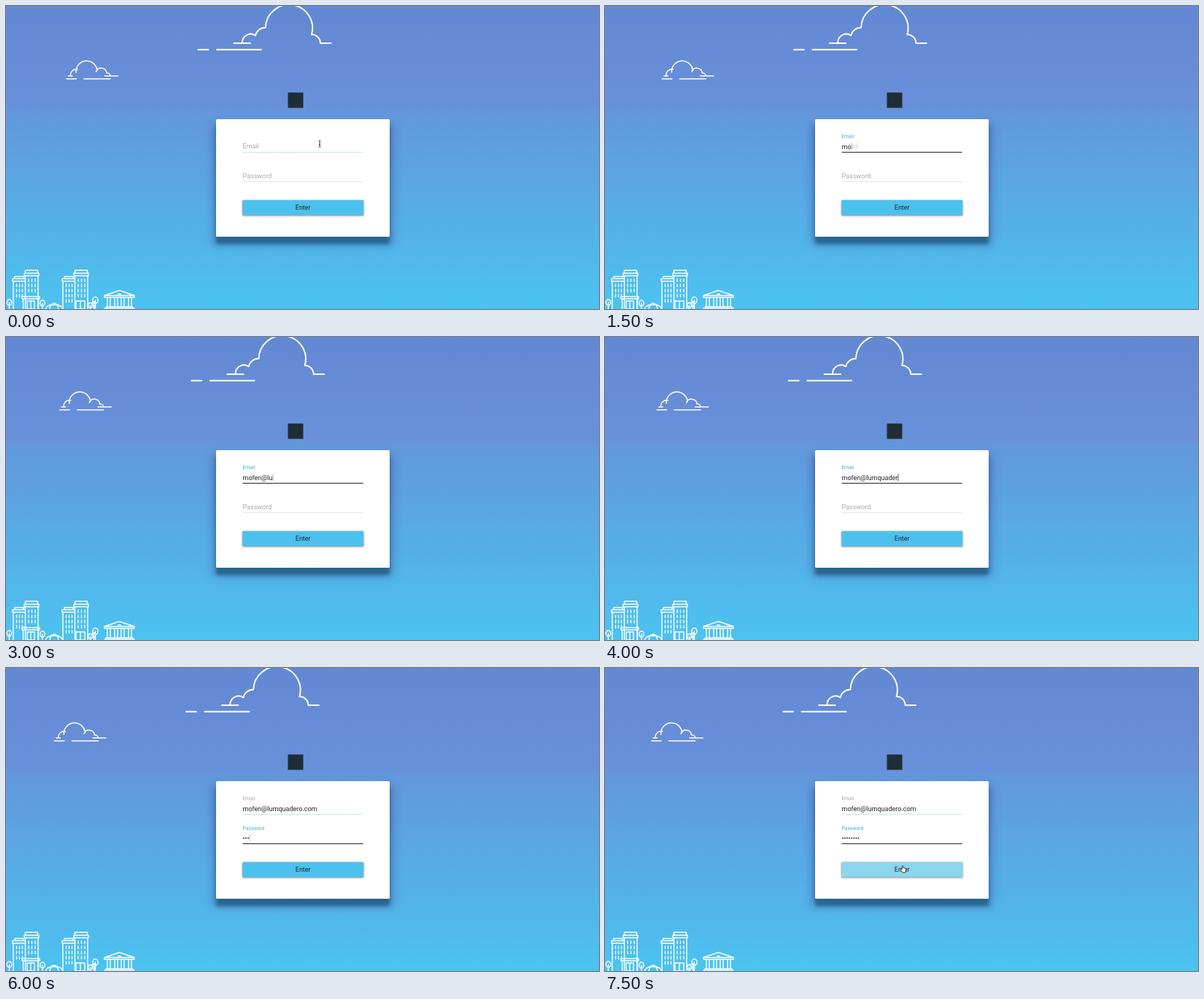
Write an HTML page that moves like this. It is 813x415 px and loops after 8000 ms.

```html
<!DOCTYPE html>
<html lang="en">
<head>
<meta charset="utf-8">
<title>Login form</title>
<style>
  html, body { margin: 0; width: 100%; height: 100%; overflow: hidden; }
  svg { display: block; width: 813px; height: 415px; }
  text { font: 9px Roboto, Arial, sans-serif; fill: #222; }
  .line { fill: none; stroke: #fff; stroke-linecap: round; stroke-linejoin: round; }
</style>
</head>
<body>
<svg viewBox="0 0 813 415" xmlns="http://www.w3.org/2000/svg">
  <defs>
    <linearGradient id="sky" x1="0" y1="0" x2="0" y2="1">
      <stop offset="0" stop-color="#6388d3"/>
      <stop offset=".325" stop-color="#6990da"/>
      <stop offset=".365" stop-color="#6298dc"/>
      <stop offset="1" stop-color="#4bc3f0"/>
    </linearGradient>
    <filter id="tight" x="-5%" y="-20%" width="110%" height="140%"><feGaussianBlur stdDeviation=".8"/></filter>
    <filter id="soft" x="-20%" y="-20%" width="140%" height="140%"><feGaussianBlur stdDeviation="2.2"/></filter>
    <filter id="wide" x="-20%" y="-20%" width="140%" height="140%"><feGaussianBlur stdDeviation="6"/></filter>
  </defs>
  <rect width="813" height="415" fill="url(#sky)"/>

  <g id="bigCloud" class="line" stroke-width="1.9">
    <path d="M263.5 59.7H277.500M289 59.7H350M312.500 51H335M324 51A11.500 11.500 0 0 1 342 40.500A14 14 0 0 1 355.800 29.500A32.200 32.200 0 1 1 419 39A12 12 0 0 1 431 51H445.500"/>
  </g>
  <g id="smallCloud" class="line" stroke-width="1.5">
    <path d="M83 99.800H96.500M107 99.800H143M85.500 95.700H91M88.500 95.700A8 8 0 0 1 98 86.800M96 91A14.500 14.500 0 0 1 125 88.500M123.500 90A7.500 7.500 0 0 1 138 91.800A4.500 4.500 0 0 1 143 95.700M135.500 95.700H153.500"/>
  </g>
  <g id="city" class="line" stroke-width="1.4"></g>

  <rect x="386.500" y="118.500" width="21" height="21" fill="#1f2d35"/>

  <rect x="283" y="161" width="248" height="167" rx="4" fill="#3f5c9c" opacity=".5" filter="url(#wide)"/>
  <rect x="288" y="164" width="238" height="162" rx="4" fill="#1f587c" opacity=".72" filter="url(#soft)"/>
  <rect x="288" y="155" width="238" height="161" rx="1.500" fill="#fff"/>

  <text id="emailLabel" x="324.500">Email</text>
  <text id="ghost" x="338" y="195" fill-opacity=".2">ail</text>
  <text id="email" x="324.500" y="195.500"></text>
  <path id="emailLine"/>
  <path id="spelling" fill="none" stroke="#e07a4a" stroke-width="1.100" stroke-dasharray="1.200 1"/>

  <text id="passLabel" x="324.500">Password</text>
  <text id="pass" x="324.500" y="235.800"></text>
  <path id="passLine"/>
  <path id="caret" stroke="#222" stroke-width=".8"/>

  <rect x="324" y="266" width="166.500" height="21.500" rx="1.500" fill="#333" opacity=".55" filter="url(#tight)"/>
  <rect id="button" x="324.500" y="266" width="165.500" height="20.500" rx="1"/>
  <text x="407.200" y="279" text-anchor="middle">Enter</text>

  <path id="beam" d="M428.500 184.500H429.500L430 185L430.500 184.500H431.500M430 185V192.500M428.500 193H429.500L430 192.500L430.500 193H431.500M429 189.500H431" fill="none" stroke="#222" stroke-width=".9"/>
  <path id="hand" d="M407.200 276V271.500Q408 270.300 408.800 271.500V273.600L412 274.300Q413 274.700 412.800 276L411.800 280H407.800L405.200 276.700Q405.200 275.300 406.200 275.500Z" fill="#fff" stroke="#222" stroke-width=".9" stroke-linejoin="round"/>
</svg>
<script>
const LOOP = 8000, STEP = 500;
const ADDRESS = 'mofen@lumquadero.com';
const LEFT = 324.5, RIGHT = 489.7;
const $ = id => document.getElementById(id);
const set = (id, attrs) => {
  for (const name in attrs) $(id).setAttribute(name, attrs[name]);
};
const show = (id, visible) => set(id, { visibility: visible ? 'visible' : 'hidden' });

const box = (x, y, w, h) => `M${x} ${y}h${w}v${h}h${-w}z`;
const ticks = (x, y, cols, rows, dx, dy, len) => {
  let d = '';
  for (let r = 0; r < rows; r++)
    for (let c = 0; c < cols; c++) d += `M${x + c * dx} ${y + r * dy}v${len}`;
  return d;
};
const tree = (x, y, r, foot) =>
  `M${x} ${y - r}a${r * .8} ${r} 0 0 1 0 ${2 * r}a${r * .8} ${r} 0 0 1 0 ${-2 * r}M${x} ${y}V${foot}`;
const tower = (x, rows) =>
  box(x + 17.5, 362, 17, 4) + box(x + 16, 366, 20, 3.5) +
  `M${x + 17.5} 369.500V415M${x + 35} 369.500V415` +
  `M${x + 1} 415V377` + box(x, 373.500, 17.5, 3.500) +
  `M${x + 3} 373.500V370.500H${x + 15}V373.500` +
  ticks(x + 22, 374, 3, rows, 4.5, 7, 3.5) + ticks(x + 5.5, 381, 3, rows, 4, 7, 3.5);

function buildCity() {
  const entrance = box(22, 398, 24, 3) + 'M23.500 401V415M44.500 401V415' +
    box(29, 404, 10, 11) + 'M34 404V415';
  const dome = 'M54 415A12.500 9 0 0 1 78 415M60 415Q61 408 66 407Q71 408 72 415M57 411Q66 407 75 411';
  const museum = 'M135 396.500L155.500 389.500L176 396.500ZM135 396.500V399H176V396.500' +
    'M137 412H174M135 414H176M153.500 394.500h4' +
    [139, 149, 158, 168].map(x => ticks(x, 400, 2, 1, 4, 0, 11)).join('');
  const trees = tree(4.500, 406, 4, 415) + tree(50, 407, 4, 415) +
    tree(115.500, 410, 3.500, 415) + tree(122.500, 403, 4.500, 415) + tree(120.500, 408, 3, 415);
  const door = box(96, 404, 12, 11) + 'M102 404V415';
  $('city').innerHTML = [tower(9, 3), tower(77, 4), entrance, door, dome, museum, trees]
    .map(d => `<path d="${d}"/>`).join('');
}

// Linear interpolation through [time, value] pairs.
function track(points, t) {
  for (let i = 1; i < points.length; i++) {
    const [t0, a] = points[i - 1], [t1, b] = points[i];
    if (t <= t1) return a + (b - a) * (t - t0) / (t1 - t0);
  }
  return points[points.length - 1][1];
}
const DRIFT = [[0, 0], [3000, -9.3], [5000, -14.4], [6000, -16.6], [8000, -20.3]];
const TYPED = [[0, 0], [1000, 0], [1500, 2], [3000, 8], [4000, 15], [5000, 20]];
const DOTS = [[0, 0], [5500, 1], [6000, 3], [7000, 8]];

function field(name, restY, floatY, lineY, focused, filled, idle) {
  const floating = focused || filled;
  const label = $(name + 'Label');
  label.setAttribute('y', floating ? floatY : restY);
  label.style.fontSize = floating ? '6.75px' : '9px';
  label.style.fill = focused ? '#3fb0dc' : '#a6a9ab';
  set(name + 'Line', {
    d: `M${LEFT} ${lineY}H${RIGHT}`,
    stroke: focused ? '#444' : idle,
    'stroke-width': focused ? 1.1 : .9,
    'stroke-dasharray': !focused && name === 'email' ? '1.500 .7' : 'none'
  });
}

function render(time) {
  const t = Math.floor(time % LOOP / STEP) * STEP;
  const move = `translate(${track(DRIFT, t).toFixed(2)} 0)`;
  set('bigCloud', { transform: move });
  set('smallCloud', { transform: move });

  const onEmail = t >= 1500 && t < 5500, onPass = t >= 5500;
  const hover = t >= 7500;
  $('email').textContent = ADDRESS.slice(0, Math.round(track(TYPED, t)));
  $('pass').textContent = onPass ? '•'.repeat(Math.round(track(DOTS, t))) : '';
  field('email', 195, 181, 200.4, onEmail, t >= 1500, '#a5d3d8');
  field('pass', 235.8, 221.6, 240.6, onPass, false, '#dfe2e4');

  const active = $(onPass ? 'pass' : 'email');
  const caretX = LEFT + active.getComputedTextLength() + .6;
  set('caret', {
    d: onPass ? `M${caretX} 228V237.500` : `M${caretX} 187.500V197.500`,
    opacity: t === 4000 ? 1 : .4
  });
  show('caret', t >= 1500 && !hover);

  show('spelling', t === 5000);
  if (t === 5000) {
    const span = n => LEFT + $('email').getSubStringLength(0, n);
    set('spelling', { d: `M${LEFT} 197.300H${span(5)}M${span(6)} 197.300H${span(16)}` });
  }
  show('ghost', t === 1500);
  show('beam', t < 1500);
  show('hand', hover);
  set('button', { fill: hover ? '#8bd5ee' : '#4bc1ee' });
}

buildCity();
const start = performance.now();
function frame() {
  render(performance.now() - start);
  requestAnimationFrame(frame);
}
frame();
</script>
</body>
</html>
```
